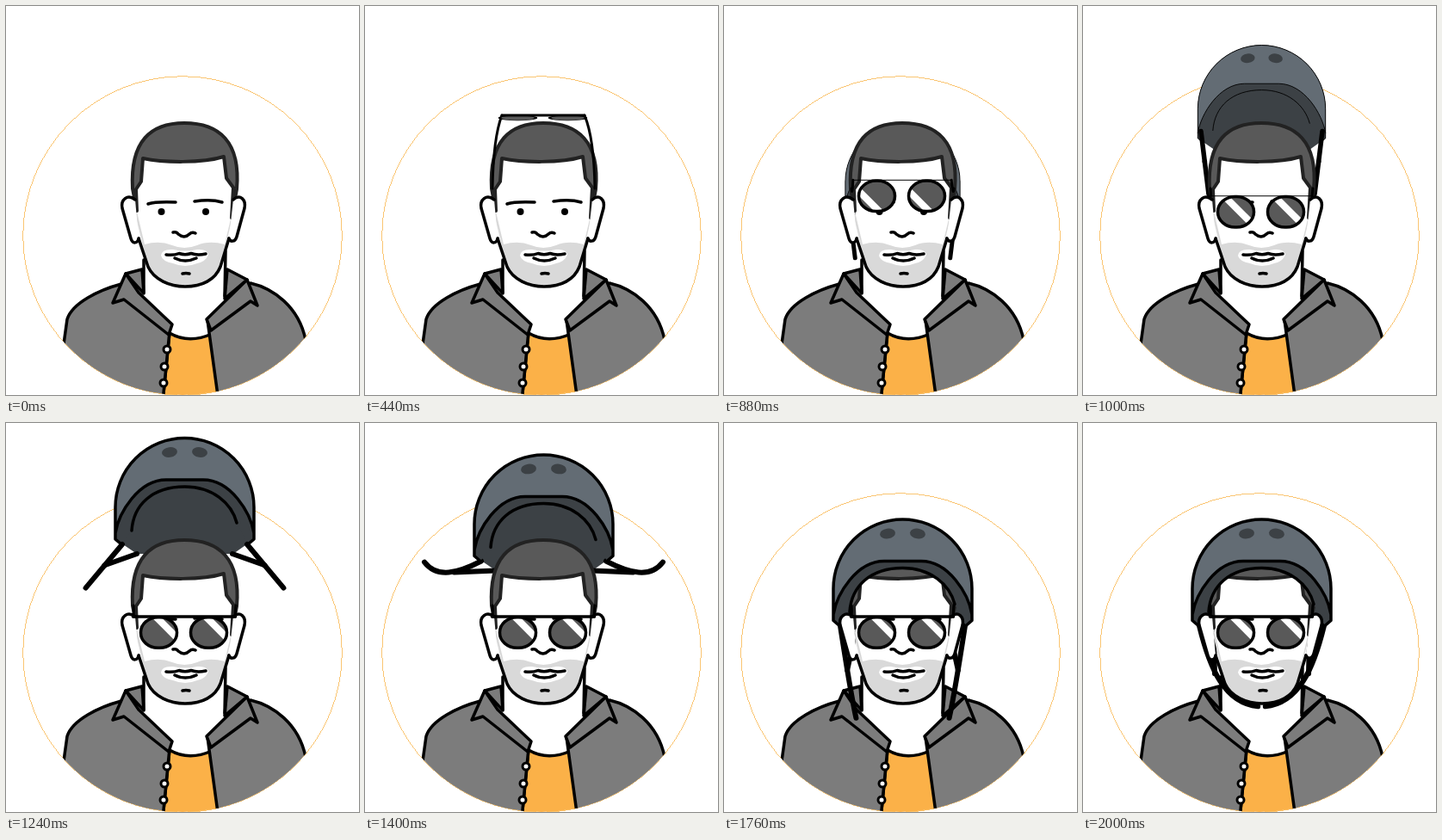
Animation, 410 px wide and 452 px high, one loop 2.96 s. Source, as an HTML page:

```html
<!DOCTYPE html>
<html lang="en">
<head>
<meta charset="utf-8">
<title>Helmet portrait</title>
<style>
  html, body { margin: 0; height: 100%; overflow: hidden; background: #fff; }
  svg { display: block; width: 410px; height: 452px; }
  .line { fill: none; stroke: #000; stroke-width: 3.5; stroke-linecap: round; stroke-linejoin: round; }
  .cloth { fill: #7c7c7c; }
  .shirt { fill: #fbb148; }
  .skin { fill: #fff; }
  .lens { fill: #595959; }
  .beard { fill: #d9d9d9; }
  .hair { fill: #595959; stroke: #222; stroke-width: 4; stroke-linejoin: round; }
  .steel { fill: #636c74; }
  .dark { fill: #3c4145; }
  .thin { stroke-width: 3; }
  .strap { stroke-width: 6; }
</style>
</head>
<body>
<svg viewBox="0 0 410 452">
  <defs>
    <clipPath id="badge"><circle cx="205" cy="267" r="185"/></clipPath>
    <rect id="lens" x="-21" y="-17.7" width="42" height="35.4" rx="20" ry="17.5"/>
    <clipPath id="rim"><use href="#lens"/></clipPath>
    <g id="strap" class="line">
      <path class="strap" id="main"/>
      <path class="strap" id="brace"/>
    </g>
    <g id="glass">
      <use href="#lens" class="lens"/>
      <g clip-path="url(#rim)"><path class="shine" d="M-15-30L45 30" stroke="#fff" stroke-width="8"/></g>
      <use href="#lens" class="line"/>
    </g>
  </defs>

  <circle cx="205" cy="267" r="185.3" fill="none" stroke="#f9b74f" stroke-width=".8" shape-rendering="crispEdges"/>

  <g clip-path="url(#badge)">
    <path class="skin" d="M160 290V332L192 372L190 385H238L234 365L254 337V290Z"/>
    <path class="line" d="M160 295V333M255 285L254 337"/>
    <path class="line shirt" d="M190 380Q212 393 239 381L248 460H182Z"/>
    <g class="line cloth">
      <path d="M66 400L71 364C77 345 108 330 134 323L190 378L182 460H60Z"/>
      <path d="M284 322C310 328 340 349 348 388L355 460H247L234 365Z"/>
      <path d="M139 311L158 306L160 334ZM257 306L280 318L254 340Z"/>
      <path d="M139 311L154 333L193 370L189 382L137 341L124 345Z"/>
      <path d="M280 318L233 364L238 377L284 343L292 348Z"/>
    </g>
    <g class="line skin thin">
      <circle cx="187" cy="399" r="4"/><circle cx="184" cy="419" r="4"/><circle cx="183" cy="438" r="4"/>
    </g>
  </g>

  <g id="back">
    <path class="dark" d="M127 135V98A80.5 80.5 0 0 1 288 98V135L264 152H152Z"/>
  </g>
  <g id="straps">
    <use href="#strap"/>
    <use href="#strap" transform="translate(415) scale(-1 1)"/>
  </g>

  <g id="head">
    <path class="skin" d="M150 200L153 245L158 280L165 303C172 318 190 326 208 326C228 326 243 318 249 303L258 275L263 240L266 200L255 172H158Z"/>
    <path class="beard" d="M149 226L152 250L165 303C172 318 190 326 208 326C228 326 243 318 249 303L262 250L266 226L254 277Q236 272 222 278Q207 284 193 278Q178 272 161 277Z"/>
    <path class="skin" d="M180 290Q181 282 194 283Q208 286 222 283Q234 282 235 289Q232 297 222 299Q208 305 194 299Q182 297 180 290Z"/>
    <path class="line" d="M154 270L165 303C172 318 190 326 208 326C228 326 243 318 249 303L259 270"/>
    <path class="line" d="M186 289Q195 290 201 287.5Q208 290 215 287.5Q222 290 232 288M196 293Q208 299 221 293M205 311Q209 310 213 311M194 263Q198 262 200 265Q207 271 213 265Q216 262 220 264"/>
    <path class="line" stroke-width="4" d="M165 230Q174 227 197 228M219 227Q238 224 251 228"/>
    <circle cx="180.5" cy="239" r="4"/><circle cx="232" cy="239" r="4"/>
    <path class="hair" d="M147 212C144 157 168 136 207 136C247 136 273 157 268 213L262 246L264 211L256 200L253 175C228 183 182 182 159 177L157 204L151 213L152 238Z"/>
  </g>

  <g id="shell">
    <path class="dark" d="M127 135V98A80.5 80.5 0 0 1 288 98V135L281 141L268 116C262 93 240 74 207.5 74C170 74 148 95 146 125L134 141Z"/>
    <path class="steel" d="M127 128V98A80.5 80.5 0 0 1 288 98V128C284 104 261 66 229 66H186C154 66 131 104 127 128Z"/>
    <ellipse class="dark" cx="190" cy="34" rx="9" ry="5.8" transform="rotate(-8 190 34)"/>
    <ellipse class="dark" cx="225" cy="34" rx="9" ry="5.8" transform="rotate(8 225 34)"/>
    <path id="edge" class="line" d="M134 141L127 135V98A80.5 80.5 0 0 1 288 98V135L281 141M127 128C131 104 154 66 186 66H229C261 66 284 104 288 128M146 125C148 95 170 74 207.5 74C240 74 262 93 268 116"/>
  </g>

  <g id="ears" class="line skin">
    <path d="M150 225C141 218 133 225 135 235L145 270C147 277 153 276 154 270"/>
    <path d="M264 225C272 218 279 225 277 235L268 268C266 275 260 274 259 270"/>
  </g>

  <g id="glasses">
    <path id="arms" class="line thin"/>
    <g id="front"><use href="#glass" x="-29.5"/><use href="#glass" x="28.5"/></g>
    <path id="bar" class="line"/>
  </g>
</svg>

<script>
const LOOP = 2960, STEP = 40;
const $ = id => document.getElementById(id);
const [shell, back, straps, ears, glasses] = ['shell', 'back', 'straps', 'ears', 'glasses'].map($);
const shine = document.querySelector('.shine');

const { sin, cos, PI, min, max } = Math;
const mix = (a, b, u) => a + (b - a) * u;
const span = (t, from, to) => min(1, max(0, (t - from) / (to - from)));
const sineOut = u => sin(u * PI / 2);
const sineInOut = u => (1 - cos(u * PI)) / 2;
const cubicInOut = u => u < .5 ? 4 * u ** 3 : 1 - 4 * (1 - u) ** 3;
const lineWidth = t => mix(1, 3.5, span(t, 1000, 1100));

const set = (id, name, value) => $(id).setAttribute(name, value);
const show = (node, on) => node.setAttribute('visibility', on ? 'visible' : 'hidden');

// The glasses tip over the hairline, then slide down to the eyes.
function drawGlasses(t) {
  show(glasses, t >= 400);
  const slide = cubicInOut(span(t, 400, 1160));
  const y = mix(130, 243.5, slide), tilt = sineOut(span(t, 390, 870));
  const half = mix(48, 59.5, slide), top = y - 18.5 * tilt, bend = min(top + 26, 222);
  set('front', 'transform', `translate(207 ${y}) scale(1 ${tilt})`);
  set('bar', 'd', `M${207 - half} ${top}h${2 * half}`);
  set('arms', 'd', `M${207 - half} ${top}Q149 ${bend} 148 212M${207 + half} ${top}Q266 ${bend} 267 212`);
  $('bar').style.strokeWidth = t < 800 ? 3 : lineWidth(t);
  shine.setAttribute('transform', `translate(${mix(-60, 0, span(t, 700, 1060))})`);
}

// The helmet rises behind the head, then lands in front of it.
function drawHelmet(t) {
  const rise = span(t, 845, 1100), fall = sineInOut(span(t, 1265, 1715));
  const top = mix(170, 17.5, sineOut(rise)) + 94.5 * fall;
  const place = `translate(207.5 ${top}) scale(${mix(.8, 1, rise)}) translate(-207.5 -17.5)`;
  for (const part of [back, straps, shell]) {
    show(part, t >= 845);
    part.setAttribute('transform', place);
  }
  $('edge').style.strokeWidth = lineWidth(t);
  (t < 1265 ? straps : ears).before(shell);
}

// Each strap swings out, is lifted by the fall, and closes under the chin.
function drawStraps(t) {
  const out = sineInOut(span(t, 1000, 1200)), lift = sin(PI * span(t, 1260, 1720));
  const close = sineInOut(span(t, 1400, 2000)), pull = close ** 2;
  const angle = (mix(-7, 40, out) + 60 * lift - 76 * close) * PI / 180;
  const length = mix(80, 66, out) + 50 * pull + 22 * sin(PI * pull);
  const sag = mix(17, -25, pull) * span(t, 1260, 1400);
  const x = mix(131, 135, out), y = mix(126, 141, out);
  const point = (along, off) => [
    x - sin(angle) * length * along + cos(angle) * off,
    y + cos(angle) * length * along + sin(angle) * off
  ];
  set('main', 'd', `M${x} ${y}C${point(.42, .8 * sag)} ${point(.78, 1.15 * sag)} ${point(1, 0)}`);
  const [jx, jy] = point(.48, .73 * sag);
  set('brace', 'd', `M${mix(jx, 152, out)} ${mix(jy, 152, out)}L${jx} ${jy}`);
}

const start = performance.now();
function frame() {
  const t = Math.floor((performance.now() - start) % LOOP / STEP) * STEP;
  drawGlasses(t);
  drawHelmet(t);
  drawStraps(t);
  requestAnimationFrame(frame);
}
frame();
</script>
</body>
</html>
```
